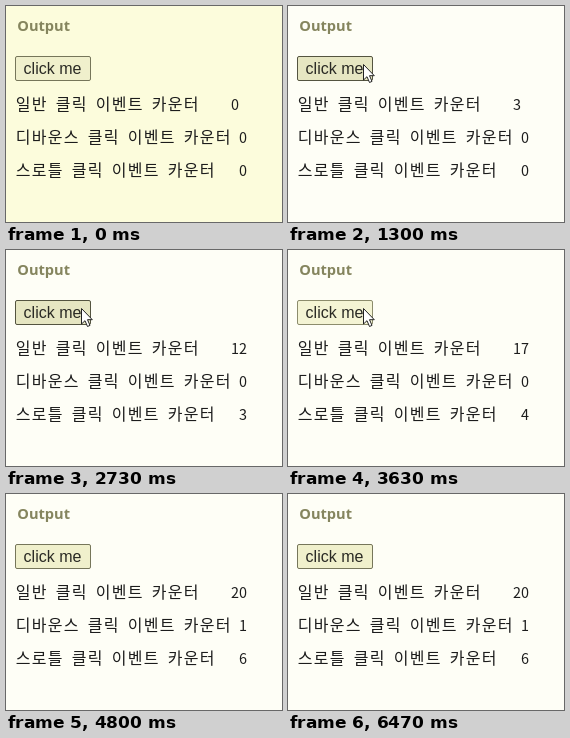
Animation of 276x216 px, one loop 6510 ms. Source, as an HTML page:

```html
<!DOCTYPE html>
<html lang="ko">
<head>
<meta charset="utf-8">
<title>Click counters</title>
<style>
  html, body { margin: 0; width: 100%; height: 100%; overflow: hidden; }
  body { animation: paper 6510ms step-end infinite; }
  svg { display: block; width: 276px; height: 216px; }
  .title { font: 700 14.6px "Open Sans", sans-serif; fill: #85855e; }
  .label { font: 16px "Liberation Sans", Arial, sans-serif; fill: #2a2a24; }
  .row { font: 300 16px "Noto Sans CJK KR", "Noto Sans CJK", sans-serif; letter-spacing: 1.28px; fill: #1c1c1c; }
  .count { font: 300 14.4px "Noto Sans CJK KR", "Noto Sans CJK", sans-serif; fill: #1c1c1c; }

  #button { fill: #f0f0cc; stroke: #76765a; }
  #button.hover { fill: #e6e6c2; stroke: #545440; }
  #button.active { fill: #f4f4d4; stroke: #8c8c6c; }

  #cursor { animation: travel 6510ms linear infinite; }
  @keyframes paper {
    0% { background: #fcfcdc; }
    15.4% { background: #fefef6; }
  }
  @keyframes travel {
    0%, 1.5% { transform: translate(250px, 220px); animation-timing-function: ease-out; }
    9.2%, 12.8% { transform: translate(78px, 57px); }
    14.2%, 69.8% { transform: translate(75px, 58px); animation-timing-function: ease-in; }
    72%, 100% { transform: translate(250px, 220px); }
  }
</style>
</head>
<body>
<svg viewBox="0 0 276 216">
  <text class="title" x="11.3" y="25">Output</text>
  <rect id="button" x="9.5" y="50.5" width="75" height="24" rx="1.5"/>
  <text class="label" x="17.6" y="68">click me</text>
  <g id="rows"></g>
  <path id="cursor" d="M.5 .5V16L4 12.7L6.5 18.5L9 17.4L6.5 11.7H11.3Z" fill="#fff" stroke="#222"/>
</svg>
<script>
  const LOOP = 6510;
  const FIRST_CLICK = 965, CLICK_GAP = 158, CLICKS = 20, PRESS = 40;
  const LAST_CLICK = FIRST_CLICK + (CLICKS - 1) * CLICK_GAP;
  const DEBOUNCED_AT = LAST_CLICK + 750;
  const THROTTLED_AT = [1465, 2065, 2660, 3250, 3830, 4360];
  const HOVER = [450, 4690];

  const button = document.getElementById("button");
  const rows = document.getElementById("rows");

  function addText(className, x, y, text) {
    const node = document.createElementNS("http://www.w3.org/2000/svg", "text");
    node.setAttribute("class", className);
    node.setAttribute("x", x);
    node.setAttribute("y", y);
    node.textContent = text;
    rows.append(node);
    return node;
  }

  // Hangul sits on a 16px grid, spaces and digits on an 8px grid.
  function addRow(y, label, countX) {
    let x = 9.7;
    for (const word of label.split(" ")) {
      addText("row", x, y, word);
      x += word.length * 16 + 8;
    }
    return addText("count", countX, y, "0");
  }

  const plain = addRow(104, "일반 클릭 이벤트 카운터", 225);
  const debounced = addRow(137, "디바운스 클릭 이벤트 카운터", 233);
  const throttled = addRow(170, "스로틀 클릭 이벤트 카운터", 233);

  function buttonState(t) {
    if (t < HOVER[0] || t > HOVER[1]) return "";
    const toClick = (((FIRST_CLICK - t) % CLICK_GAP) + CLICK_GAP) % CLICK_GAP;
    const clicking = t > FIRST_CLICK - PRESS && t < LAST_CLICK;
    return clicking && toClick < PRESS ? "active" : "hover";
  }

  function setText(node, value) {
    if (node.textContent !== String(value)) node.textContent = value;
  }

  function draw() {
    const t = performance.now() % LOOP;
    const clicks = Math.floor((t - FIRST_CLICK) / CLICK_GAP) + 1;
    setText(plain, Math.max(0, Math.min(CLICKS, clicks)));
    setText(debounced, t >= DEBOUNCED_AT ? 1 : 0);
    setText(throttled, THROTTLED_AT.filter(at => t >= at).length);
    button.setAttribute("class", buttonState(t));
    requestAnimationFrame(draw);
  }
  draw();
</script>
</body>
</html>
```
